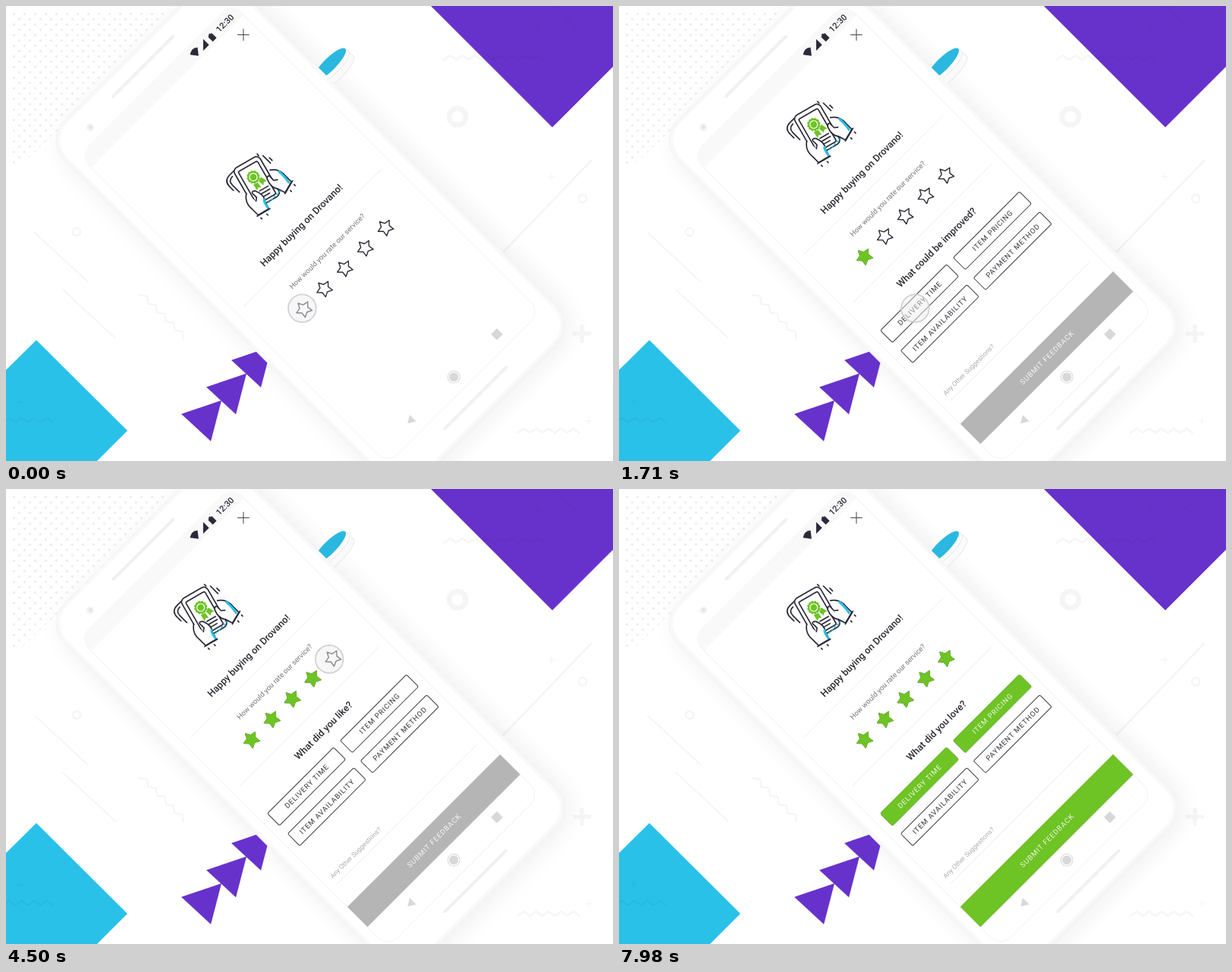
These frames come from a looping animation (800x600 px, 8 s). An HTML page:

```html
<!DOCTYPE html>
<html lang="en">
<head>
<meta charset="utf-8">
<title>Rate our service</title>
<style>
  html, body { margin: 0; width: 100%; height: 100%; overflow: hidden; background: #fff; }
  svg { display: block; width: 100vw; height: 100vh; font-family: Roboto, sans-serif; }
  .line { fill: none; stroke-linecap: round; stroke-linejoin: round; }
  .decor { stroke: #000; stroke-opacity: .04; }
  .title { font-size: 12.62px; font-weight: 500; fill: #2b2b33; text-anchor: middle; }
  .small { font-size: 9.47px; fill: #757575; text-anchor: middle; }
  .caps { font-size: 9.47px; letter-spacing: .9px; text-anchor: middle; }
  .rule { stroke: #f1f1f1; stroke-width: 1; }
  .ink { stroke: #2a2a3a; stroke-width: 1.7; }
</style>
</head>
<body>
<svg viewBox="0 0 800 600" preserveAspectRatio="xMidYMid meet">
  <defs>
    <pattern id="dots" x="7" y="7" width="14" height="14" patternUnits="userSpaceOnUse">
      <circle cx="3.5" cy="3.5" r="1.8" fill="#efefef"/>
      <circle cx="10.5" cy="10.5" r="1.8" fill="#efefef"/>
    </pattern>
    <filter id="soft" x="-40%" y="-20%" width="180%" height="140%"><feGaussianBlur stdDeviation="17"/></filter>
  </defs>

  <rect width="800" height="600" fill="#fff"/>
  <path d="M8 8H230L20 210H8Z" fill="url(#dots)"/>
  <g transform="rotate(-45)">
    <rect x="-86" y="172" width="322" height="660" rx="36" fill="#000" opacity=".075" filter="url(#soft)"/>
  </g>
  <path d="M560 0 720 160 800 80V0Z" fill="#6732cb"/>
  <path d="M0 480 40 440.500 160 560 120 600H0Z" fill="#2ac1e9"/>
  <g id="decor" class="line decor"></g>
  <g id="arrows" fill="#6732cb"></g>

  <g transform="rotate(-45)">
    <g stroke="#e9e9e9">
      <ellipse cx="247" cy="371" rx="30" ry="8" fill="#fafafa"/>
      <path d="M225 356H277V371H225Z" fill="#fcfcfc" stroke="none"/>
      <path d="M277 356V371M225 369Q270 373 276.500 363" fill="none"/>
    </g>
    <ellipse cx="247" cy="356" rx="29.500" ry="8.300" fill="#2ab8e0"/>

    <rect x="-88.700" y="161.500" width="322" height="666" rx="36" fill="#f9f9f9" stroke="#f3f3f3"/>
    <rect x="-84" y="166" width="312.500" height="657" rx="32" fill="#fff"/>
    <rect x="-71.500" y="208" width="284.500" height="575" rx="18" fill="#fff" stroke="#f3f3f3"/>
    <path d="M-71.500 230V226Q-71.500 208-53.500 208H195Q213 208 213 226V230Z" fill="#f9f9f9"/>
    <g class="line" stroke="#f0f0f0" stroke-width="4"><path d="M16 184H127M15 803H129"/></g>
    <circle cx="-34.600" cy="191.600" r="5" fill="#f3f3f3"/>
    <circle cx="-34" cy="191.600" r="2.600" fill="#e6e6e6"/>

    <g fill="#2a2a3a">
      <path d="M133 226 126 217Q133 211.500 140 217Z"/>
      <path d="M142 225.500H153V214.500Z"/>
      <path d="M159.500 226V217H161.500V215.500H164.500V217H166.500V226Z"/>
      <text x="188" y="223.900" font-size="11.050" font-weight="500" text-anchor="middle">12:30</text>
    </g>
    <path d="M189.300 242.800 199.700 253.200M199.700 242.800 189.300 253.200" class="line" stroke="#555" stroke-width="1.100"/>

    <g id="review">
      <g id="icon" transform="translate(71 292)" class="line"></g>
      <text class="title" x="70.700" y="386">Happy buying on Drovano!</text>
      <path class="rule" d="M-59 404H200"/>
      <text class="small" x="70.700" y="433.300">How would you rate our service?</text>
      <g id="stars"></g>
    </g>

    <g id="headings"></g>
    <g id="details">
      <path class="rule" d="M-59 494.600H200M-59 677H200"/>
      <g id="chips"></g>
      <text x="-59" y="668" font-size="8.600" fill="#aaa">Any Other Suggestions?</text>
      <path d="M-71.500 707.800H213V745.300H-71.500Z" fill="#b5b5b5"/>
      <path id="submit" d="M-71.500 707.800H213V745.300H-71.500Z" fill="#6ec325"/>
      <text class="caps" x="71.200" y="730" fill="#fff" fill-opacity=".88">SUBMIT FEEDBACK</text>
    </g>

    <g fill="#d8d8d8">
      <path d="M-15 763.500-5 757.500V769.500Z"/>
      <circle cx="71.400" cy="763.300" r="6"/>
      <circle cx="71.400" cy="763.300" r="8" fill="none" stroke="#d8d8d8"/>
      <rect x="145.800" y="758" width="11.200" height="11.200" rx="1"/>
    </g>
    <circle id="pointer" r="18.300" fill="#eee" fill-opacity=".48" stroke="#cacaca" stroke-opacity=".85" stroke-width="1.800"/>
  </g>
</svg>

<script>
const GREEN = '#6ec325', CYAN = '#2ac1e9', INK = '#2a2a3a', LOOP = 8000;
const $ = id => document.getElementById(id);
const range = n => [...Array(n).keys()];

// Background ornaments
const zigzag = (x, y, n, turn = 0) =>
  `<path transform="translate(${x} ${y}) rotate(${turn})" stroke-width="2.2" d="M0 3${
    range(n).map(i => `l8.200 ${i % 2 ? 6 : -6}`).join('')}"/>`;
const plus = (x, y, r, w) => `<path stroke-width="${w}" d="M${x - r} ${y}h${2 * r}M${x} ${y - r}v${2 * r}"/>`;
const ring = (x, y, r, w) => `<circle cx="${x}" cy="${y}" r="${r}" stroke-width="${w}"/>`;
const stroke = (d, w) => `<path d="${d}" stroke-width="${w}"/>`;

$('decor').innerHTML =
  zigzag(577, 68, 16) + zigzag(674, 560, 10) + zigzag(-4, 546, 8) + zigzag(178, 379, 10, 45) +
  plus(701, 28, 4, 1.5) + plus(719, 225, 4, 1.5) + plus(768, 547, 4, 1.5) + plus(19, 522, 4, 1.5) +
  `<g stroke-linecap="butt">${plus(759, 432, 12, 5)}</g>` +
  ring(595, 146, 11, 7) + ring(760, 254, 5.2, 2.5) + ring(93, 298, 5, 2.5) +
  stroke('M38 299 107 363M75 374 144 438M722 0 755 32', 2) + stroke('M771 204 655 325', 2.8);

$('arrows').innerHTML = range(3).map(i =>
  `<path transform="translate(${33 * i} ${-35.5 * i})" d="M231 538 284 520 270 574Z"/>`).join('');

// Hands holding a tablet with a badge
const scallops = range(12).map(i => {
  const a = i * Math.PI / 6;
  return `<circle cx="${6.8 * Math.cos(a)}" cy="${6.8 * Math.sin(a)}" r="2"/>`;
}).join('');
const hand = `
  <path class="ink" fill="#fff" d="M-22 9C-28 13-32 20-31 29L-31 40-15 44-12 34C-8 29-8 22-11 15-14 11-17 13-16 17L-16 22-20 25"/>
  <path class="ink" d="M-33 40-14 45M-31 45V47M-22 47V49"/>`;
$('icon').innerHTML = `
  <path class="ink" d="M-31-6V-13Q-31-24-20-24H-12M-27 1V-12Q-27-20-19-20M29-11V3M25-18V-15M33-3V2"/>
  <g transform="rotate(15)">
    <rect class="ink" fill="#fff" x="-19" y="-22" width="39" height="60" rx="6"/>
    <rect class="ink" x="-14" y="-16" width="29" height="50" rx="2" stroke-width="1.2"/>
    <path class="ink" d="M-2 20H11M-2 24.500H11M-2 29H8"/>
  </g>
  <g fill="${GREEN}">
    ${scallops}<circle r="7"/>
    <path d="M-7 7-9 16-5 14.500-2 17-1 9ZM7 7 9 16 5 14.500 2 17 1 9Z"/>
  </g>
  <circle r="5" fill="${GREEN}" stroke="#fff" stroke-width="1.200"/>
  <path d="M-9 38H12" stroke="${CYAN}" stroke-width="2" stroke-dasharray="1 4"/>
  ${hand}<path d="M-11 31Q-14 34-15 42" stroke="${CYAN}" stroke-width="3"/>
  <g transform="scale(-1 1)">${hand}</g>
  <path d="M29 19Q30 27 28 38" stroke="${CYAN}" stroke-width="3"/>`;

// Stars, headings and chips
const starPoints = range(10).map(i => {
  const a = i * Math.PI / 5 - Math.PI / 2, r = i % 2 ? 5.7 : 10.9;
  return `${(r * Math.cos(a)).toFixed(2)},${(r * Math.sin(a)).toFixed(2)}`;
}).join(' ');
$('stars').innerHTML = range(5).map(i => `
  <g transform="translate(${-5 + 38 * i} 462.300)" stroke-linejoin="round" stroke-width="1.400">
    <polygon points="${starPoints}" fill="none" stroke="${INK}"/>
    <polygon class="fill" points="${starPoints}" fill="${GREEN}" stroke="${GREEN}"/>
  </g>`).join('');

$('headings').innerHTML = ['What could be improved?', 'What did you like?', 'What did you love?']
  .map(s => `<text class="title" x="70.700" y="525.300">${s}</text>`).join('');

$('chips').innerHTML = ['DELIVERY TIME', 'ITEM PRICING', 'ITEM AVAILABILITY', 'PAYMENT METHOD'].map((s, i) => {
  const x = i % 2 ? 76.9 : -58.9, y = i < 2 ? 546.2 : 584;
  const box = `x="${x}" y="${y}" width="123.200" height="22.400" rx="2"`;
  const label = fill => `<text class="caps" x="${x + 62}" y="${y + 14.6}" fill="${fill}">${s}</text>`;
  return `<rect ${box} fill="#fff" stroke="#3a3a42"/>${label('#33333b')}
    <g class="fill"><rect ${box} fill="${GREEN}" stroke="${GREEN}"/>${label('#f0f9e8')}</g>`;
}).join('');

const starFills = document.querySelectorAll('#stars .fill');
const chipFills = document.querySelectorAll('#chips .fill');
const headings = $('headings').children;

// Timeline
const starTimes = [480, 2190, 3000, 3810, 4620];
const chipTimes = [5800, 7110];
const moves = [ // start, duration, x, y, opacity
  [1770, 360, 32, 461.5, 1],
  [2610, 330, 70, 461.5, 1],
  [3420, 330, 108, 460.5, 1],
  [4230, 330, 145, 460, 1],
  [5010, 490, -1.4, 554.4, .6],
  [6570, 430, 138, 552, .6],
  [7400, 220, 138, 552, 0]
];

const ease = x => x < .5 ? 2 * x * x : 1 - 2 * (1 - x) ** 2;
const ramp = (t, start, span) => ease(Math.min(1, Math.max(0, (t - start) / span)));
const fade = (el, value) => el.setAttribute('opacity', value.toFixed(3));

function draw(t) {
  $('review').setAttribute('transform', `translate(0 ${98 * (1 - ramp(t, 840, 462))})`);
  fade($('headings'), ramp(t, 1150, 400));
  fade($('details'), ramp(t, 1210, 390));
  starFills.forEach((el, i) => fade(el, ramp(t, starTimes[i], 150)));
  chipFills.forEach((el, i) => fade(el, i < 2 ? ramp(t, chipTimes[i], 200) : 0));
  fade($('submit'), ramp(t, chipTimes[0], 240));

  const like = ramp(t, starTimes[3], 150), love = ramp(t, starTimes[4], 150);
  [1 - like, like - love, love].forEach((v, i) => fade(headings[i], v));

  let state = [-5.9, 557.9, 1];
  for (const [start, span, ...next] of moves) {
    const k = ramp(t, start, span);
    state = state.map((v, i) => v + (next[i] - v) * k);
  }
  $('pointer').setAttribute('transform', `translate(${state[0]} ${state[1]})`);
  fade($('pointer'), state[2]);
}

const begin = performance.now();
function tick() {
  draw((performance.now() - begin) % LOOP);
  requestAnimationFrame(tick);
}
tick();
</script>
</body>
</html>
```
